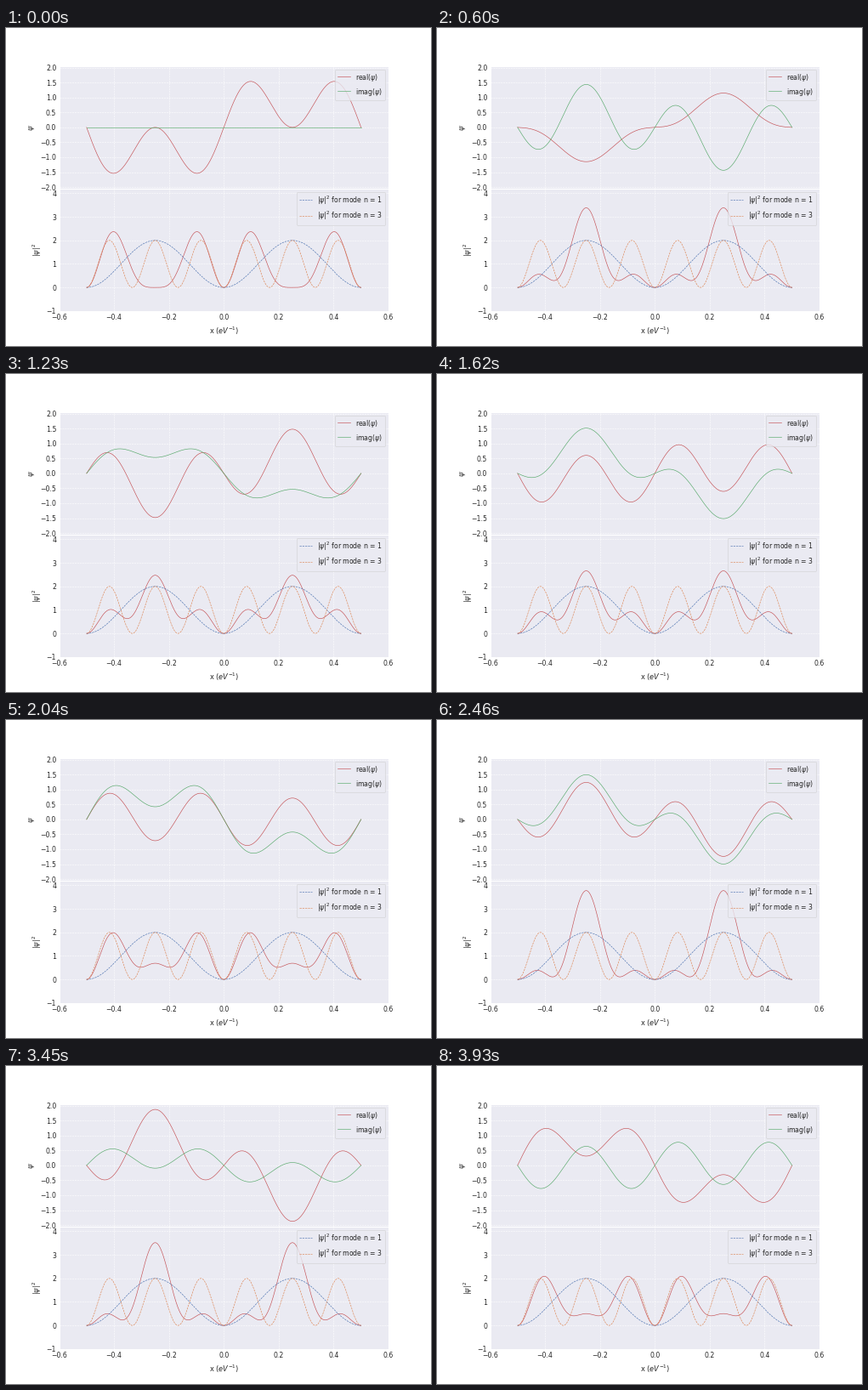
A matplotlib script that plays this animation: 500 px wide and 374 px high, repeating every 3960 ms.

```python
import numpy as np
import matplotlib.pyplot as plt
from matplotlib.animation import FuncAnimation
from matplotlib.ticker import MultipleLocator

DPI = 64
PX = 72 / DPI  # points per pixel
FRAMES = 132
OMEGA = np.pi ** 2 / 400  # phase of mode 1 per frame

RED, GREEN, BLUE, ORANGE = "#c44e52", "#55a868", "#4c72b0", "#dd8452"
PANEL, INK = "#eaeaf2", "#262626"
LINE = 0.62 * PX

plt.rcParams.update({
    "font.family": "DejaVu Sans",
    "mathtext.fontset": "dejavusans",
    "text.color": INK,
    "axes.labelcolor": INK,
    "axes.labelsize": 8.3 * PX,
    "axes.labelpad": 4.2 * PX,
    "axes.facecolor": PANEL,
    "axes.edgecolor": "white",
    "axes.linewidth": 1.0 * PX,
    "axes.axisbelow": True,
    "axes.grid": True,
    "grid.color": "white",
    "grid.linestyle": "--",
    "grid.linewidth": 0.55 * PX,
    "xtick.color": INK,
    "ytick.color": INK,
    "xtick.labelsize": 7.7 * PX,
    "ytick.labelsize": 7.7 * PX,
    "xtick.major.size": 0,
    "ytick.major.size": 0,
    "xtick.major.pad": 3.6 * PX,
    "ytick.major.pad": 3.3 * PX,
    "legend.fontsize": 7.7 * PX,
    "legend.handleheight": 1.75,
    "legend.labelspacing": 0.5,
    "lines.linewidth": LINE,
})

x = np.linspace(-0.5, 0.5, 600)


def mode(n):
    return np.sqrt(2) * np.sin(2 * np.pi * n * x)


def psi(t):
    """Equal mix of modes 1 and 3; energy grows as n squared."""
    return sum(mode(n) * np.exp(-1j * n ** 2 * OMEGA * t) for n in (1, 3)) / np.sqrt(2)


fig, (top, low) = plt.subplots(2, 1, sharex=True, figsize=(500 / DPI, 374 / DPI), dpi=DPI)
fig.subplots_adjust(left=0.125, right=0.9, bottom=0.11, top=0.88, hspace=0)

real, = top.plot(x, psi(0).real, color=RED, label=r"real($\psi$)")
imag, = top.plot(x, psi(0).imag, color=GREEN, label=r"imag($\psi$)")
top.set_ylim(-2.05, 2.05)
top.yaxis.set_major_locator(MultipleLocator(0.5))
top.set_ylabel(r"$\psi$")

density, = low.plot(x, abs(psi(0)) ** 2, color=RED)
for n, color in ((1, BLUE), (3, ORANGE)):
    low.plot(x, mode(n) ** 2, "--", color=color, label=rf"$|\psi|^2$ for mode n = {n}")
low.set_xlim(-0.6, 0.6)
low.set_ylim(-1, 4.2)
low.xaxis.set_major_locator(MultipleLocator(0.2))
low.yaxis.set_major_locator(MultipleLocator(1))
low.set_xlabel(r"x ($eV^{-1}$)")
low.set_ylabel(r"$|\psi|^2$")

for ax in (top, low):
    legend = ax.legend(loc="upper right")
    legend.get_frame().set_linewidth(0.6 * PX)


def update(t):
    wave = psi(t)
    real.set_ydata(wave.real)
    imag.set_ydata(wave.imag)
    density.set_ydata(abs(wave) ** 2)
    return real, imag, density


anim = FuncAnimation(fig, update, frames=FRAMES, interval=30, repeat=True, repeat_delay=0)
plt.show()
```
